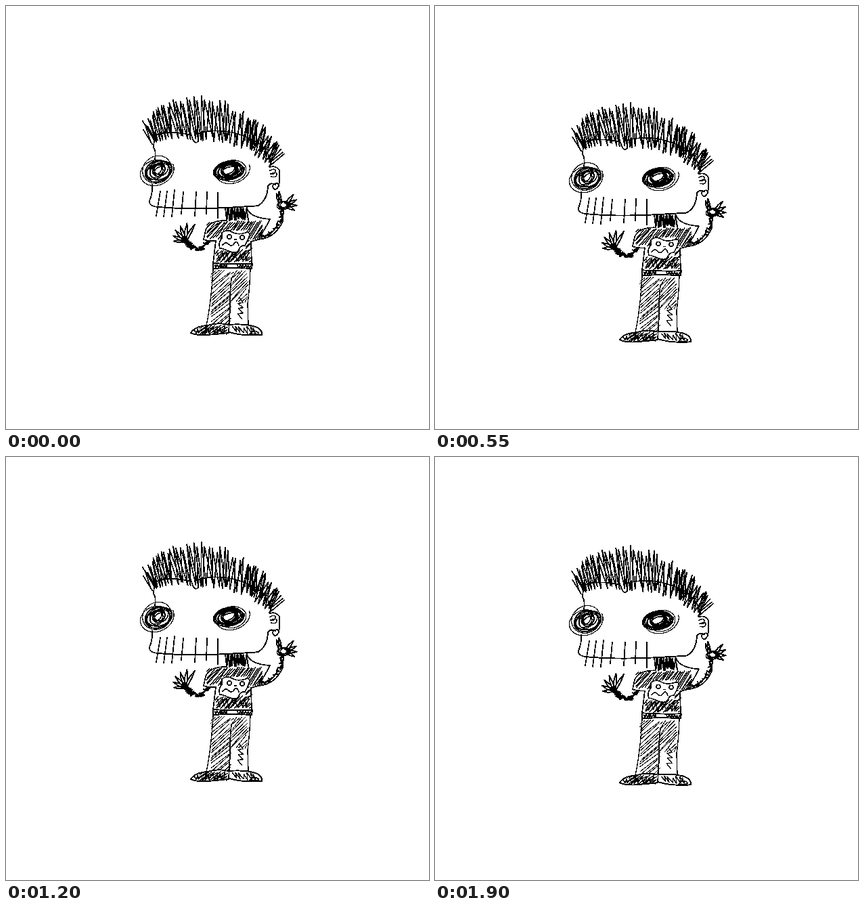
An HTML page for the animation above (1950 ms loop, 625 by 625 pixels).

```html
<!DOCTYPE html>
<html lang="en">
<head>
<meta charset="utf-8">
<title>Floating doodle</title>
<style>
  html, body { margin: 0; width: 100%; height: 100%; overflow: hidden; background: #fff; }
  svg { display: block; width: 100vw; height: 100vh; }
  path { fill: none; stroke: #000; stroke-linecap: round; stroke-linejoin: round; shape-rendering: crispEdges; }
</style>
</head>
<body>
<svg viewBox="0 0 625 625"><g id="figure"></g></svg>
<script>
const LOOP = 1950, STEP = 50, LIFT = 10.5;
const figure = document.getElementById('figure');

let seed = 11;
const rand = () => (seed = (seed * 16807) % 2147483647) / 2147483647;
const jitter = size => (rand() * 2 - 1) * size;
const mix = (a, b, t) => a + (b - a) * t;
const mixPoint = (p, q, t) => [mix(p[0], q[0], t), mix(p[1], q[1], t)];
const shake = (p, size) => p.map(v => v + jitter(size));

// Point on a Bezier curve of any degree.
function bezier(points, t) {
  while (points.length > 1) points = points.slice(1).map((p, i) => mixPoint(points[i], p, t));
  return points[0];
}

function draw(d, width = 1.7, fill = 'none') {
  const path = document.createElementNS('http://www.w3.org/2000/svg', 'path');
  path.setAttribute('d', d);
  path.style.strokeWidth = width;
  path.style.fill = fill;
  figure.append(path);
}

const toPath = points => 'M' + points.map(p => p.map(v => v.toFixed(1)).join(' ')).join('L');

// Pen running back and forth between two curves.
function zigzag(from, to, count, rough = 1.2, width = 1.7) {
  const points = [];
  for (let i = 0; i < count; i++) points.push(shake(bezier(i % 2 ? to : from, i / (count - 1)), rough));
  draw(toPath(points), width);
}

// Rising diagonal lines clipped to a box.
function hatch(x0, y0, x1, y1, step, slope = 1, width = 1.4) {
  const rise = slope * (x1 - x0);
  let d = '';
  for (let y = y0 + step; y < y1 + rise; y += step * (1 + jitter(0.35))) {
    const start = y > y1 ? [x0 + (y - y1) / slope, y1] : [x0, y];
    const end = y - rise < y0 ? [x0 + (y - y0) / slope, y0] : [x1, y - rise];
    d += toPath([shake(start, 1.5), shake(end, 1.5)]);
  }
  draw(d, width);
}

// Tilted ellipses whose size and centre wander as the pen goes round.
function scribble(x, y, rx, ry, tilt, turns, low, width = 1.6) {
  const points = [];
  for (let a = 0; a < turns * 2 * Math.PI; a += 0.25) {
    const size = mix(low, 0.88, 0.5 + 0.5 * Math.sin(a * 0.37 + 1));
    const u = rx * (size * Math.cos(a) + 0.12 * Math.cos(a * 0.61));
    const v = ry * (size * Math.sin(a) + 0.12 * Math.sin(a * 0.43));
    points.push([x + u * Math.cos(tilt) - v * Math.sin(tilt), y + u * Math.sin(tilt) + v * Math.cos(tilt)]);
  }
  draw(toPath(points), width);
}

function hair() {
  const tips = [[204, 180], [225, 106], [355, 116], [412, 216]];
  const roots = [[214, 202], [245, 190], [350, 186], [392, 238]];
  const spikes = 22;
  for (const shift of [0, 0.35]) {
    const points = [];
    for (let i = 0; i < spikes; i++) {
      const at = (i + shift) / spikes, next = (i + shift + 0.5) / spikes;
      const drop = rand() * 0.2;
      points.push(shake(bezier(roots, at), 4));
      points.push(mixPoint(bezier(tips, next), bezier(roots, next), drop));
    }
    draw(toPath(points), 1.7);
  }
  zigzag([[352, 198], [376, 208], [392, 238]], [[356, 166], [386, 172], [410, 218]], 18, 3);
  draw('M202 170L214 190M203 183L216 204');
  draw('M219 195Q223 187 242 187T274 191Q278 206 284 200V188Q316 180 345 190Q387 202 392 233');
}

function head() {
  draw('M219 195L218 209Q222 214 220 227M216 264Q217 276 212 288Q211 296 225 297');
  draw('M225 297Q270 301 325 298T372 295Q386 288 387 266Q391 260 398 264', 1.9);
  draw('M390 238Q399 235 404 243Q406 271 397 271Q391 266 397 263T403 266');
  draw('M390 243Q398 239 398 244T391 248Q400 244 400 249T392 252', 1.5);
  [228, 238, 249, 262, 281, 297, 313].forEach((x, i) => {
    draw(toPath([[x, 274 + jitter(2)], [x - 6 + i, 310 + jitter(3)]]));
  });
}

function eyes() {
  scribble(222, 244, 27, 22, -0.4, 2, 0.85, 1.2);
  scribble(225, 243, 22, 17, -0.5, 10, 0.35);
  scribble(334, 243, 27, 20, -0.3, 1.5, 0.85, 1.2);
  scribble(329, 243, 24, 14.5, -0.2, 12, 0.45, 1.8);
}

function shirt() {
  draw('M324 298L326 317M356 298Q360 313 390 315');
  zigzag([[327, 299], [355, 299]], [[326, 316], [357, 315]], 26, 1.5, 2);
  draw('M324 317Q301 317 295 331L292 345Q300 348 310 347L306 380M390 315Q383 329 373 345L362 348L363 381');
  hatch(297, 320, 322, 343, 3.6, 1.1);
  hatch(322, 319, 360, 331, 3.8, 1.3);
  hatch(356, 319, 378, 344, 4, 1.5);
  hatch(354, 346, 362, 362, 4);
  hatch(310, 361, 361, 378, 3.8, 1.1);
  zigzag([[312, 366], [360, 364]], [[314, 376], [359, 377]], 15, 2, 1.5);
  draw('M319 335Q326 329 334 334T354 335T353 354Q347 353 344 360T329 362T316 358Q313 350 319 343Z', 1.6, '#fff');
  draw('M327 341a3 3 0 1 0 6 0a3 3 0 1 0-6 0M346 342a3 3 0 1 0 6 0a3 3 0 1 0-6 0M338 345h2M320 353Q325 347 329 352T337 351T344 354', 1.5);
}

function trousers() {
  draw('M306 380Q335 382 364 381L363 388Q335 386 306 388Z', 1.9);
  zigzag([[309, 382], [327, 382]], [[309, 387], [327, 387]], 12, 0.8);
  zigzag([[342, 382], [362, 383]], [[342, 387], [362, 387]], 11, 0.8);
  draw('M306 389Q303 440 296 472M361 389Q360 418 357 440L358 470', 1.4);
  draw('M333 402Q330 430 331 447L329 483');
  hatch(304, 392, 331, 470, 4.6, 0.85, 1.1);
  hatch(333, 392, 356, 436, 4.6, 1, 1.1);
  zigzag([[344, 432], [342, 458]], [[350, 434], [349, 462]], 8, 1, 1.4);
}

function shoes() {
  draw('M328 471Q314 467 298 472Q279 473 273 483Q282 487 297 486T328 483', 1.9);
  hatch(286, 473, 326, 484, 3, 0.6);
  zigzag([[279, 478], [325, 473]], [[277, 484], [322, 484]], 18, 1.5);
  draw('M330 471Q350 469 366 473Q379 477 378 486Q350 488 330 482', 1.9);
  zigzag([[334, 474], [366, 475]], [[338, 481], [372, 484]], 13, 1.5, 1.5);
  draw('M361 484Q366 478 372 482T360 485');
}

// Scribbled tube along a curve.
function arm(curve, thick) {
  const points = [];
  for (let i = 0; i <= 60; i++) points.push(shake(bezier(curve, i / 60), thick / 2));
  draw(toPath(points), 1.8);
}

// Pointed fingers spread between two angles, in degrees.
function fingers(x, y, first, last, count, short, long) {
  for (let i = 0; i < count; i++) {
    const t = i / (count - 1), a = mix(first, last, t) * Math.PI / 180, reach = mix(short, long, t);
    const along = (r, side) => [x + r * Math.cos(a) - side * Math.sin(a), y + r * Math.sin(a) + side * Math.cos(a)];
    draw(toPath([along(3, -2), along(reach * 0.6, -2), along(reach, 0), along(reach * 0.6, 1.5), along(2, 2)]), 1.9);
  }
}

function hands() {
  fingers(265, 347, 178, 300, 6, 17, 28);
  arm([[262, 345], [270, 350], [274, 356]], 8);
  arm([[268, 349], [284, 370], [298, 348]], 7);
  fingers(406, 293, -112, -98, 2, 17, 19);
  fingers(412, 295, -52, 25, 4, 21, 16);
  scribble(410, 294, 11, 7, -0.2, 4, 0.5);
  arm([[407, 298], [408, 334], [376, 342]], 6);
  draw('M373 345Q398 343 409 318L410 302');
}

[hair, head, eyes, hands, shirt, trousers, shoes].forEach(part => part());

function tick() {
  const time = Math.floor(performance.now() % LOOP / STEP) * STEP;
  const y = LIFT * Math.sin(2 * Math.PI * time / LOOP);
  figure.setAttribute('transform', `translate(0 ${y.toFixed(2)})`);
  requestAnimationFrame(tick);
}
tick();
</script>
</body>
</html>
```
